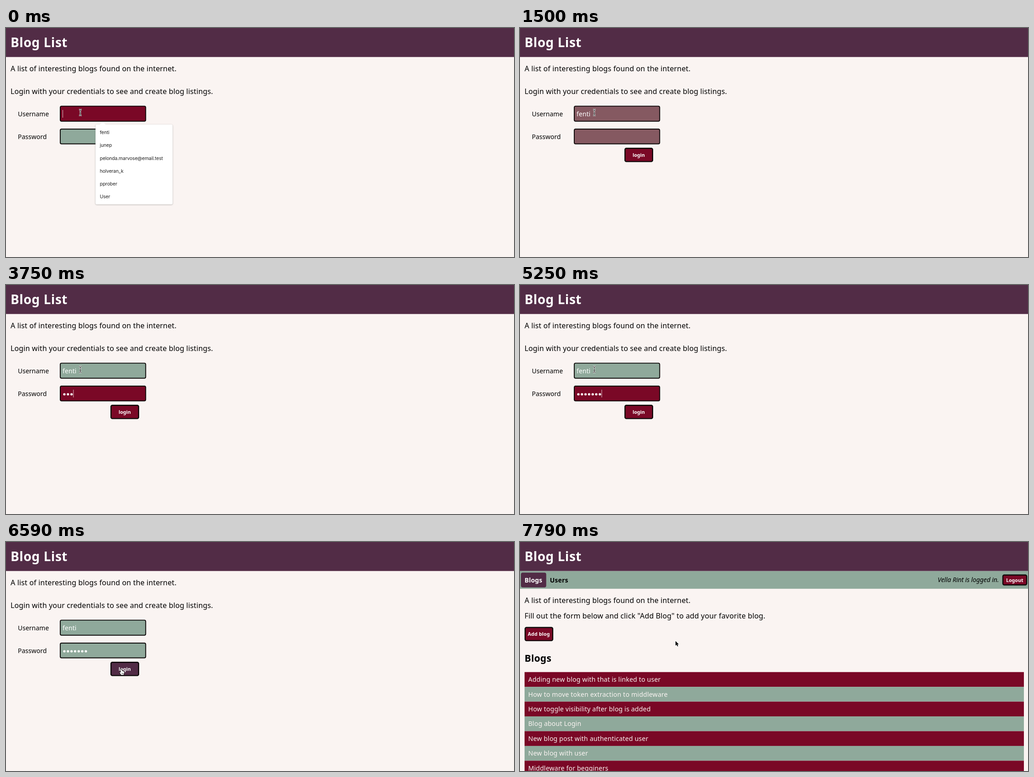
An HTML page with a canvas for the animation above (8000 ms loop, 1114x503 px).

```html
<!DOCTYPE html>
<html lang="en">
<head>
<meta charset="utf-8">
<title>Blog List</title>
<style>
  html, body { margin: 0; width: 100%; height: 100%; overflow: hidden; background: #faf4f2; }
  canvas { display: block; }
</style>
</head>
<body>
<canvas id="stage" width="1114" height="503"></canvas>
<script>
const ctx = document.getElementById('stage').getContext('2d');
const LOOP = 8000;
const SANS = '"Noto Sans", "Open Sans", sans-serif';
const UI = 'Inter, Roboto, sans-serif';
const PAPER = '#faf4f2', PLUM = '#522c46', WINE = '#7a0826', SAGE = '#8fa99b', INK = '#0b0808';

const USER = 'fenti';
const SUGGESTIONS = [USER, 'junep', 'pelonda.marvose@email.test', 'holveran_k', 'pprober', 'User'];
const BLOGS = [
  'Adding new blog with that is linked to user',
  'How to move token extraction to middleware',
  'How toggle visibility after blog is added',
  'Blog about Login',
  'New blog post with authenticated user',
  'New blog with user',
  'Middleware for begginers'
];

// Each track is a list of [start time, value]; a value holds until the next start.
const USER_KEYS = [[0, 0], [450, 1], [600, 2], [750, 3], [900, 4], [1050, 5]];
const PASS_KEYS = [[0, 0], [3300, 1], [3600, 2], [3750, 3], [3900, 4], [4200, 5], [4950, 6], [5250, 7]];
const PASS_CARET = [[0, 0], [1650, 1], [2250, 0], [2700, 1], [3150, 0], [3300, 1], [4800, 0], [4950, 1], [5850, 0]];
const USER_FOCUS = [[0, 1], [1500, 0.5], [1650, 0]];
const PASS_FOCUS = [[0, 0], [1500, 0.5], [1650, 1], [6440, 0.5], [6590, 0]];
const POINTER = [
  [0, ['beam', 163, 185.7]],
  [5550, ['beam', 168, 192]],
  [5700, ['beam', 196, 232]],
  [5850, ['hand', 236, 276]],
  [6000, ['arrow', 257, 295]],
  [6150, ['hand', 254, 285.5]],
  [6740, ['arrow', 252.5, 280]],
  [7640, ['arrow', 314, 237]],
  [7790, ['arrow', 341, 217.5]]
];

function at(track, t) {
  let value = track[0][1];
  for (const [start, v] of track) if (t >= start) value = v;
  return value;
}

function text(str, x, y, size, { color = '#000', style = '', font = SANS, spacing = 0, align = 'left' } = {}) {
  ctx.font = `${style} ${size}px ${font}`;
  ctx.letterSpacing = spacing + 'px';
  ctx.textAlign = align;
  ctx.fillStyle = color;
  ctx.fillText(str, x, y);
  return ctx.measureText(str).width;
}

function rect(x, y, w, h, color) {
  ctx.fillStyle = color;
  ctx.fillRect(x, y, w, h);
}

function box(x, y, w, h, r, fill, line = 0) {
  ctx.beginPath();
  ctx.roundRect(x + line / 2, y + line / 2, w - line, h - line, r);
  ctx.fillStyle = fill;
  ctx.fill();
  if (line) {
    ctx.lineWidth = line;
    ctx.strokeStyle = INK;
    ctx.stroke();
  }
}

function mix(a, b, k) {
  const channel = (c, i) => parseInt(c.slice(i, i + 2), 16);
  return `rgb(${[1, 3, 5].map(i => Math.round(channel(a, i) * (1 - k) + channel(b, i) * k))})`;
}

function button(label, x, y, w, h, fill, textX, baseline, spacing = 0) {
  box(x, y, w, h, 3, fill, 2.4);
  text(label, textX, baseline, 10.67, { color: '#fff', style: 'bold', spacing });
}

function caret(x, y) {
  rect(x, y, 1, 17, 'rgba(255,255,255,0.75)');
}

function popup(w, items) {
  const h = 6.8 + items.length * 28.1;
  ctx.save();
  ctx.shadowColor = 'rgba(0,0,0,0.3)';
  ctx.shadowBlur = 3;
  ctx.shadowOffsetY = 0.8;
  box(196.3, 212, w, h, 3, '#fff');
  ctx.restore();
  ctx.beginPath();
  ctx.moveTo(205, 212.5);
  ctx.lineTo(212, 206.3);
  ctx.lineTo(219, 212.5);
  ctx.fillStyle = '#fff';
  ctx.fill();
  items.forEach((item, i) =>
    text(item, 205.7, 233.3 + i * 28.1, 10.4, { color: '#222', font: UI, spacing: -0.15 }));
}

function outline(path, fill, edge, width) {
  ctx.lineJoin = 'round';
  ctx.lineWidth = width;
  ctx.strokeStyle = edge;
  ctx.stroke(path);
  ctx.fillStyle = fill;
  ctx.fill(path);
}

const BEAM = new Path2D('M-3 -6.5Q0 -6.5 0 -4.5Q0 -6.5 3 -6.5M0 -5V5M-3 6.5Q0 6.5 0 4.5Q0 6.5 3 6.5M-1.5 1.5H1.5');
const ARROW = new Path2D('M0 0V10.2L2.4 8L4 11.8L5.8 11L4.2 7.3H7.2Z');
const HAND = new Path2D('M-2.6 -6.2Q-1.5 -7 -0.8 -5.6L0.2 -2Q1.2 -3 2 -1.8Q3 -2.4 3.6 -1.2Q5 -1.4 5 0.2V3L3.8 6.5H-1.4L-4.6 1.6Q-5 0 -3.4 0.2L-1.9 1.5L-3.4 -4.8Q-3.4 -5.8 -2.6 -6.2Z');

function pointer([kind, x, y]) {
  ctx.save();
  ctx.translate(x, y);
  if (kind === 'beam') {
    for (const [color, width] of [['#fff', 2.8], ['#111', 1]]) {
      ctx.strokeStyle = color;
      ctx.lineWidth = width;
      ctx.stroke(BEAM);
    }
  } else if (kind === 'hand') {
    outline(HAND, '#fff', '#000', 1.6);
    ctx.lineWidth = 0.6;
    ctx.stroke(new Path2D('M0 2V4.8M1.7 2V4.8M3.3 2V4.8'));
  } else {
    outline(ARROW, '#000', '#fff', 1.8);
  }
  ctx.restore();
}

function loginPage(t) {
  text('A list of interesting blogs found on the internet.', 10, 95, 16, { spacing: 0.15 });
  text('Login with your credentials to see and create blog listings.', 10, 144.7, 16, { spacing: 0.13 });
  text('Username', 26, 193.5, 14);
  text('Password', 26, 243.5, 14);

  box(118, 170.7, 189.3, 35, 3, mix(SAGE, WINE, at(USER_FOCUS, t)), 1.9);
  box(118, 221, 189.3, 34.5, 3, mix(SAGE, WINE, at(PASS_FOCUS, t)), 1.9);

  const typed = at(USER_KEYS, t);
  const width = text(USER.slice(0, typed), 124, 193.5, 14, { color: '#fff', spacing: 0.1 });
  if (t < 1500) caret(124 + width, 180);

  const dots = at(PASS_KEYS, t);
  ctx.fillStyle = '#fff';
  for (let i = 0; i < dots; i++) {
    ctx.beginPath();
    ctx.arc(128 + i * 7.85, 240, 2.6, 0, Math.PI * 2);
    ctx.fill();
  }
  if (at(PASS_CARET, t)) caret(123.8 + dots * 7.85, 230);

  const over = (t >= 5850 && t < 6000) || t >= 6150;
  button('login', 229, 263, 63, 31.6, over ? PLUM : WINE, 247, 283);

  if (t < 450) popup(169, SUGGESTIONS);
  else if (t < 1050) popup(122, [USER]);
}

function blogPage() {
  rect(0, 64, 1114, 38.7, SAGE);
  box(2, 67.3, 55.5, 32.5, 4, PLUM);
  text('Blogs', 10, 89, 14, { color: '#fff', style: 'bold', spacing: 0.15 });
  text('Users', 65.5, 89, 14, { style: 'bold', spacing: 0.2 });
  text('Vella Rint is logged in.', 1050, 88.3, 14, { style: 'italic', align: 'right', spacing: -0.1 });
  button('Logout', 1057.7, 71.3, 54.6, 24.2, WINE, 1066, 87.5);

  text('A list of interesting blogs found on the internet.', 10, 134, 16, { spacing: 0.15 });
  text('Fill out the form below and click "Add Blog" to add your favorite blog.', 10, 168, 16, { spacing: 0.15 });
  button('Add blog', 10, 186.5, 63, 31.3, WINE, 17, 206.3, 0.2);
  text('Blogs', 10, 263.3, 21, { style: 'bold', spacing: 0.35 });

  BLOGS.forEach((title, i) => {
    const y = 285.7 + i * 32.45;
    rect(10, y, 1095, 32.45, i % 2 ? SAGE : WINE);
    text(title, 18, y + 21.4, 14.2, { color: PAPER, spacing: 0.15 });
  });
}

function draw(t) {
  rect(0, 0, 1114, 503, PAPER);
  rect(0, 0, 1114, 63.7, PLUM);
  text('Blog List', 10, 42, 28, { color: '#fff', style: 'bold', spacing: 0.55 });
  if (t < 6740) loginPage(t);
  else blogPage();
  pointer(at(POINTER, t));
}

const start = performance.now();
function tick() {
  draw((performance.now() - start) % LOOP);
  requestAnimationFrame(tick);
}
tick();
</script>
</body>
</html>
```
